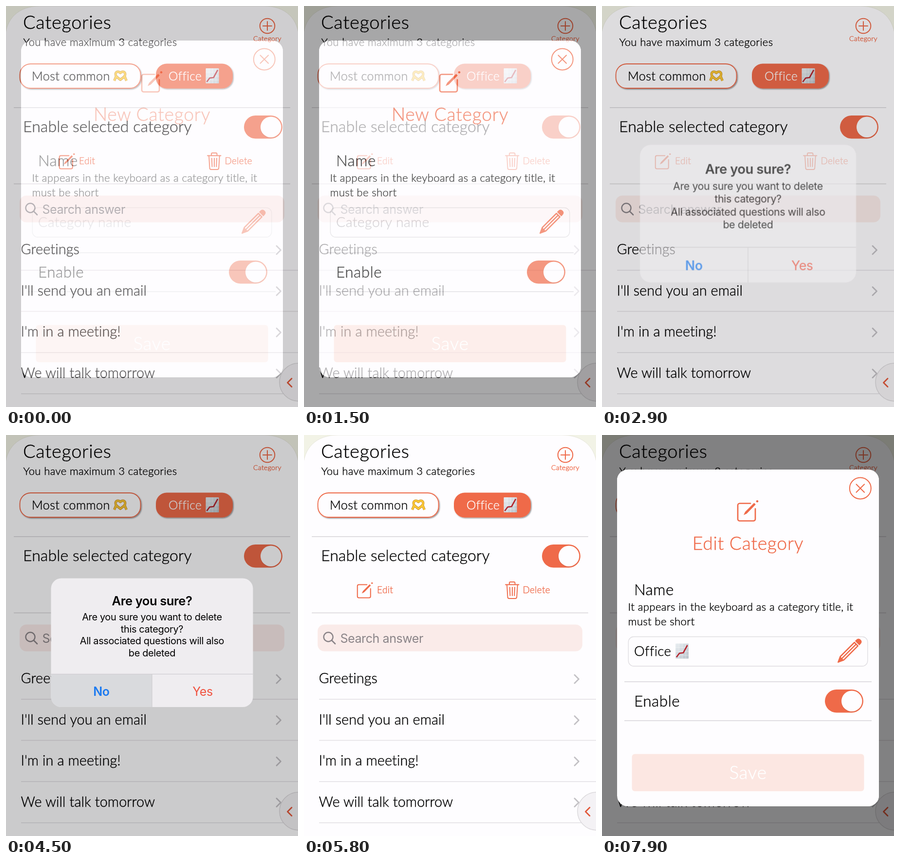
These frames come from a looping animation (600x824 px, 8000 ms). An HTML page:

```html
<!DOCTYPE html>
<html lang="en">
<head>
<meta charset="utf-8">
<title>Categories</title>
<style>
  html, body { margin: 0; width: 100%; height: 100%; overflow: hidden; background: #f2f3e6; }
  svg { display: block; width: 600px; height: 824px; }
  text { font-family: Lato, "Open Sans", sans-serif; font-weight: 300; letter-spacing: .018em; stroke-width: .45px; white-space: pre; }
  .tight { letter-spacing: .004em; }
  .ui { font-family: Inter, "Liberation Sans", sans-serif; font-weight: 400; letter-spacing: -.017em; stroke-width: 0; }
  .bold { font-weight: 600; }
  .mid { text-anchor: middle; }
  .line { fill: none; stroke: #ef6a49; stroke-width: 2; stroke-linecap: round; stroke-linejoin: round; }
  #alert { transform-origin: 300px 427px; }
  #newModal, #editModal, #alert, #dim, #press { opacity: 0; }
</style>
</head>
<body>
<svg id="stage" viewBox="0 0 600 824">
  <defs>
    <linearGradient id="paper" x1="0" y1="0" x2="1" y2="1">
      <stop offset="0" stop-color="#e9eef2"/><stop offset="1" stop-color="#b9c2ca"/>
    </linearGradient>
    <filter id="soft" x="-10%" y="-20%" width="125%" height="150%">
      <feDropShadow dx="1.6" dy="1.6" stdDeviation="1" flood-color="#000" flood-opacity=".42"/>
    </filter>
    <g id="compose">
      <path class="line" style="stroke-width:2.7" d="M29 8H7a4 4 0 0 0-4 4V40a4 4 0 0 0 4 4H35a4 4 0 0 0 4-4V19"/>
      <path fill="#ef6a49" d="M15 32L18 25.500L36.500 7L39.800 10.300L21.500 29Z"/>
      <circle cx="43" cy="3.800" r="2.300" fill="#ef6a49"/>
    </g>
    <g id="chart">
      <rect width="27" height="31" rx="1" fill="url(#paper)"/>
      <path d="M0 8H27M0 16H27M0 24H27M7 0V31M14 0V31M21 0V31" stroke="#fff" stroke-opacity=".5" stroke-width=".8"/>
      <path d="M2 28L8 20L16 19L24.500 3.500" fill="none" stroke="#b4232c" stroke-width="2.600" stroke-linejoin="round"/>
    </g>
    <path id="hands" d="M235 151.500L227.500 145.500C221 138 229 131 235 137.500C241 131 249 138 242.500 145.500ZM226 145L222.500 153.500M244 145L247.500 153.500"/>
    <g id="toggle">
      <rect width="79" height="47.500" rx="23.750" fill="#ef6a49"/>
      <circle cx="55" cy="25" r="21.300" fill="#000" opacity=".08"/>
      <circle cx="55.300" cy="23.800" r="21.300" fill="#fefdff"/>
    </g>
  </defs>
</svg>
<script>
const ORANGE = '#ef6a49', WHITE = '#fefdff', LOOP = 8000;

const text = (s, x, y, size, fill = '#000', cls = '') =>
  `<text x="${x}" y="${y}" font-size="${size}" class="${cls}" fill="${fill}" stroke="${fill}">${s}</text>`;
const box = (x, y, w, h, r, fill, more = '') =>
  `<rect x="${x}" y="${y}" width="${w}" height="${h}" rx="${r}" fill="${fill}" ${more}/>`;
const rule = (x1, x2, y, color = '#d6d4d8') =>
  `<path d="M${x1} ${y}H${x2}" stroke="${color}" stroke-width="1.5"/>`;
const line = (d, more = '') => `<path class="line" d="${d}" style="${more}"/>`;
const use = (id, x, y, k = 1) => `<use href="#${id}" transform="translate(${x} ${y}) scale(${k})"/>`;

const row = (s, i) => {
  const y = 501 + i * 84.6;
  return text(s, 30.5, y + 9, 28.8, '#000', 'tight') +
    line(`M556 ${y - 8}l8.500 8.500l-8.500 8.500`, 'stroke:#c3c1c5;stroke-width:2.8') +
    rule(31, 600, y + 42, '#e1dfe3');
};

const page = `
  <rect width="600" height="824" fill="#f2f3e6"/>
  <path d="M-2 830V70C-2 26 26 0 70 0H530C574 0 602 26 602 70V830Z" fill="${WHITE}" stroke="#e6e6da"/>
  ${text('Categories', 35, 46.5, 38)}
  ${text('You have maximum 3 categories', 35.5, 82, 22)}
  <circle class="line" cx="537" cy="41" r="15.300"/>
  ${line('M528 41H546M537 32V50')}
  ${text('Category', 537, 72, 14.2, ORANGE, 'mid')}
  ${box(28.5, 119, 248, 50, 22, WHITE, `stroke="${ORANGE}" stroke-width="1.800" filter="url(#soft)"`)}
  ${text('Most common', 53, 152.5, 25)}
  <use href="#hands" fill="none" stroke="#c4861a" stroke-width="5" stroke-linejoin="round"/>
  <use href="#hands" fill="none" stroke="#fbc936" stroke-width="3.400" stroke-linejoin="round"/>
  ${box(308, 118.5, 158, 51, 22, ORANGE, 'filter="url(#soft)"')}
  ${text('Office', 334, 152.5, 24.5, '#fff')}
  ${use('chart', 410.5, 128)}
  ${rule(16, 584, 208.8)}
  ${text('Enable selected category', 35, 258.5, 32, '#000', 'tight')}
  ${use('toggle', 489, 225)}
  ${use('compose', 107.5, 301.5, .75)}
  ${text('Edit', 150, 324.5, 19, ORANGE)}
  ${line('M414 307.500H441.500M422 307V304Q422 302 424 302H431.500Q433.500 302 433.500 304V307M417 308L418.500 333Q418.700 336 421.500 336H434Q437 336 437.200 333L438.800 308M422.800 313L423.500 330M428 313V330M433 313L432.300 330', 'stroke-width:1.9')}
  ${text('Delete', 449.5, 324.5, 18.9, ORANGE)}
  ${rule(16, 584, 365.5)}
  ${box(28, 389.5, 544, 55, 14, '#faebe9')}
  <circle class="line" cx="50" cy="415" r="9.500" style="stroke:#8a8488;stroke-width:2.4"/>
  ${line('M57 422L64 429', 'stroke:#8a8488;stroke-width:2.6')}
  ${text('Search answer', 74.5, 426.5, 25, '#8a8488', 'ui')}
  ${['Greetings', 'I\'ll send you an email', 'I\'m in a meeting!', 'We will talk tomorrow'].map(row).join('')}
  <circle cx="601" cy="773" r="39" fill="#f4f2f5" stroke="#dbd9dc" stroke-width="1.500"/>
  ${line('M587 765.500L578.500 774L587 782.500', 'stroke-width:2.8;stroke:#e2583a')}`;

// The shade leaves a hole where the card sits.
const modal = (id, title, field) => `<g id="${id}">
  <path fill-rule="evenodd" fill-opacity=".49" d="M0 0H600V824H0ZM53 71H547a22 22 0 0 1 22 22V741a22 22 0 0 1-22 22H53a22 22 0 0 1-22-22V93a22 22 0 0 1 22-22Z"/>
  ${box(31, 71, 538, 692, 22, WHITE)}
  <circle class="line" cx="530.800" cy="109.500" r="22"/>
  ${line('M522.500 101.200L539.100 117.800M539.100 101.200L522.500 117.800')}
  ${use('compose', 276, 132.5)}
  ${text(title, 300, 235.5, 37.4, ORANGE, 'mid')}
  ${text('Name', 66, 329, 31.2)}
  ${text('It appears in the keyboard as a category title, it', 53.5, 361, 22.1)}
  ${text('must be short', 53.5, 390.5, 22.1)}
  ${box(54.2, 414.5, 491.6, 60.5, 11, WHITE, 'stroke="#dfdde1" stroke-width="1.300"')}
  ${field}
  <g transform="translate(484 468) rotate(-45)">
    <path class="line" style="stroke-width:2.6" d="M2 0L13 -5H54V5H13ZM13 0H54"/>
    <path fill="${ORANGE}" d="M0 0L13 -5V5ZM57 -6.300H61Q67 -6 67 0T61 6.300H57Z"/>
  </g>
  ${rule(46, 554, 507)}
  ${text('Enable', 66, 557.5, 31.4)}
  ${use('toggle', 458, 523)}
  ${rule(46, 554, 587)}
  ${box(61.5, 655.5, 477, 76.5, 6, '#fce7e2')}
  ${text('Save', 300, 706.5, 37, '#fff', 'mid')}
</g>`;

const alertLines = ['Are you sure you want to delete', 'this category?', 'All associated questions will also', 'be deleted'];
const alertBox = `<rect id="dim" width="600" height="824"/>
<g id="alert">
  ${box(92.5, 294.5, 415, 264.5, 21, '#efedf0')}
  <path id="press" d="M92.500 491H300V559H113.500a21 21 0 0 1-21-21Z" fill="#d9dadd"/>
  ${text('Are you sure?', 300, 350, 25.6, '#000', 'ui bold mid')}
  ${alertLines.map((s, i) => text(s, 300, 381 + i * 24.6, 19.9, '#000', 'ui mid')).join('')}
  <path d="M92.500 491.300H507.500M300 491V559" stroke="#cfcdd1" stroke-width="1.200"/>
  ${text('No', 196, 535.5, 25, '#1c7af0', 'ui bold mid')}
  ${text('Yes', 404, 535.5, 25, '#f0523f', 'ui mid')}
</g>`;

document.getElementById('stage').insertAdjacentHTML('beforeend', page +
  modal('newModal', 'New Category', text('Category name', 66, 454, 28.3, '#c8c5ca')) +
  modal('editModal', 'Edit Category', text('Office', 66, 454, 27.4) + use('chart', 151, 428.5)) +
  alertBox);

// Each entry is [time in ms, value], held until the next one.
function play(id, steps, frame = v => ({ opacity: v })) {
  const all = steps[0][0] ? [[0, 0], ...steps] : steps;
  const keys = all.map(([t, v]) => ({ ...frame(v), offset: t / LOOP, easing: 'step-end' }));
  keys.push({ ...frame(all[all.length - 1][1]), offset: 1 });
  document.getElementById(id).animate(keys, { duration: LOOP, iterations: Infinity });
}
const from = (start, values) => values.map((v, i) => [start + i * 100, v]);

const show = from(2800, [.2, .65, .87, .96, .99, 1]);
const hide = from(4600, [.88, .56, .25, .07, 0]);

play('newModal', [...from(0, [.38, .63, .83, .95, .99, 1]), ...from(1400, [.92, .7, .42, .18, .05, 0])]);
play('editModal', from(5900, [.16, .42, .66, .85, .96, 1]));
play('dim', [...show, ...hide], v => ({ opacity: v * .2 }));
play('alert', [...show, ...hide]);
play('alert', [...show, [5000, 0]], v => ({ transform: `scale(${1.2 - .2 * v})` }));
play('press', [[4500, 1], [5000, 0]]);
</script>
</body>
</html>
```
